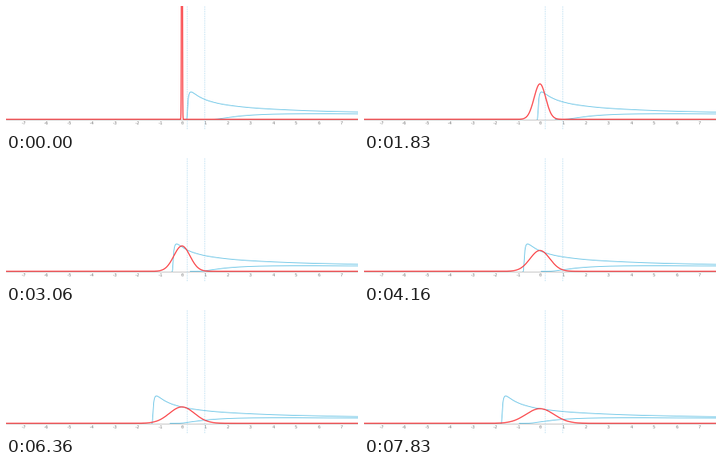
Animation of 440x156 px, one loop 8 s. Source, as a matplotlib script:

```python
import numpy as np
import matplotlib.pyplot as plt
from matplotlib.animation import FuncAnimation

WIDTH, HEIGHT, DPI = 440, 156, 100
LOOP, INTERVAL = 8000, 20
UNIT, ORIGIN_X, BASE_Y = 28.45, 219.9, 142.5
DIFFUSION = 0.1
PROBES = (0.2, 1.0)
RED, BLUE, PALE, GREY = "#fa4448", "#5fc0e4", "#c3e2f2", "#777777"
PX = 72 / DPI

START, STEP = 500, 146       # ms: first move and time between moves
PAUSE_FROM, PAUSE_TO = 820, 1140
TAU_FIRST, TAU_PAUSE, TAU_RESUME, TAU_RATE = 0.037, 0.111, 0.147, 0.264e-3


def heat_kernel(x, tau):
    return np.exp(-x**2 / (4 * DIFFUSION * tau)) / np.sqrt(4 * np.pi * DIFFUSION * tau)


def to_px(x, y):
    return ORIGIN_X + UNIT * x, BASE_Y - UNIT * y


def tau_at(ms):
    """Diffusion time, which advances in even jumps with one early pause."""
    if ms < START:
        return 0.001
    held = START + (ms - START) // STEP * STEP
    if held < PAUSE_TO:
        return np.interp(held, [START, PAUSE_FROM], [TAU_FIRST, TAU_PAUSE])
    return TAU_RESUME + TAU_RATE * (held - PAUSE_TO)


fig = plt.figure(figsize=(WIDTH / DPI, HEIGHT / DPI), dpi=DPI, facecolor="white")
ax = fig.add_axes([0, 0, 1, 1])
ax.set(xlim=(0, WIDTH), ylim=(HEIGHT, 0))
ax.axis("off")

ax.plot([0, WIDTH], [BASE_Y] * 2, color="#a0a0a0", lw=0.6 * PX)
for n in range(-7, 8):
    ax.text(ORIGIN_X + UNIT * n + 0.5, 147.4, str(n), color=GREY,
            family="DejaVu Sans Mono", size=5.4 * PX, ha="center", va="center")
for probe in PROBES:
    ax.plot([ORIGIN_X + UNIT * probe] * 2, [0, HEIGHT], color=PALE,
            lw=0.9 * PX, ls=(0, (2, 1.2)))

histories = [ax.plot([], [], color=BLUE, lw=0.9 * PX)[0] for _ in PROBES]
profile, = ax.plot([], [], color=RED, lw=1.4 * PX)

ages = 1e-4 + 10 * np.linspace(0, 1, 500)**2
grid = 8 * np.linspace(-1, 1, 801)**3    # densest around the spike


def update(frame):
    tau = tau_at(frame * INTERVAL + INTERVAL / 2)
    profile.set_data(*to_px(grid, heat_kernel(grid, tau)))
    # Each history scrolls left so its present moment sits on its probe line.
    for line, probe in zip(histories, PROBES):
        line.set_data(*to_px(probe - tau + ages, heat_kernel(probe, ages)))
    return [*histories, profile]


anim = FuncAnimation(fig, update, frames=LOOP // INTERVAL, interval=INTERVAL,
                     repeat=True, repeat_delay=0, blit=False)
plt.show()
```
